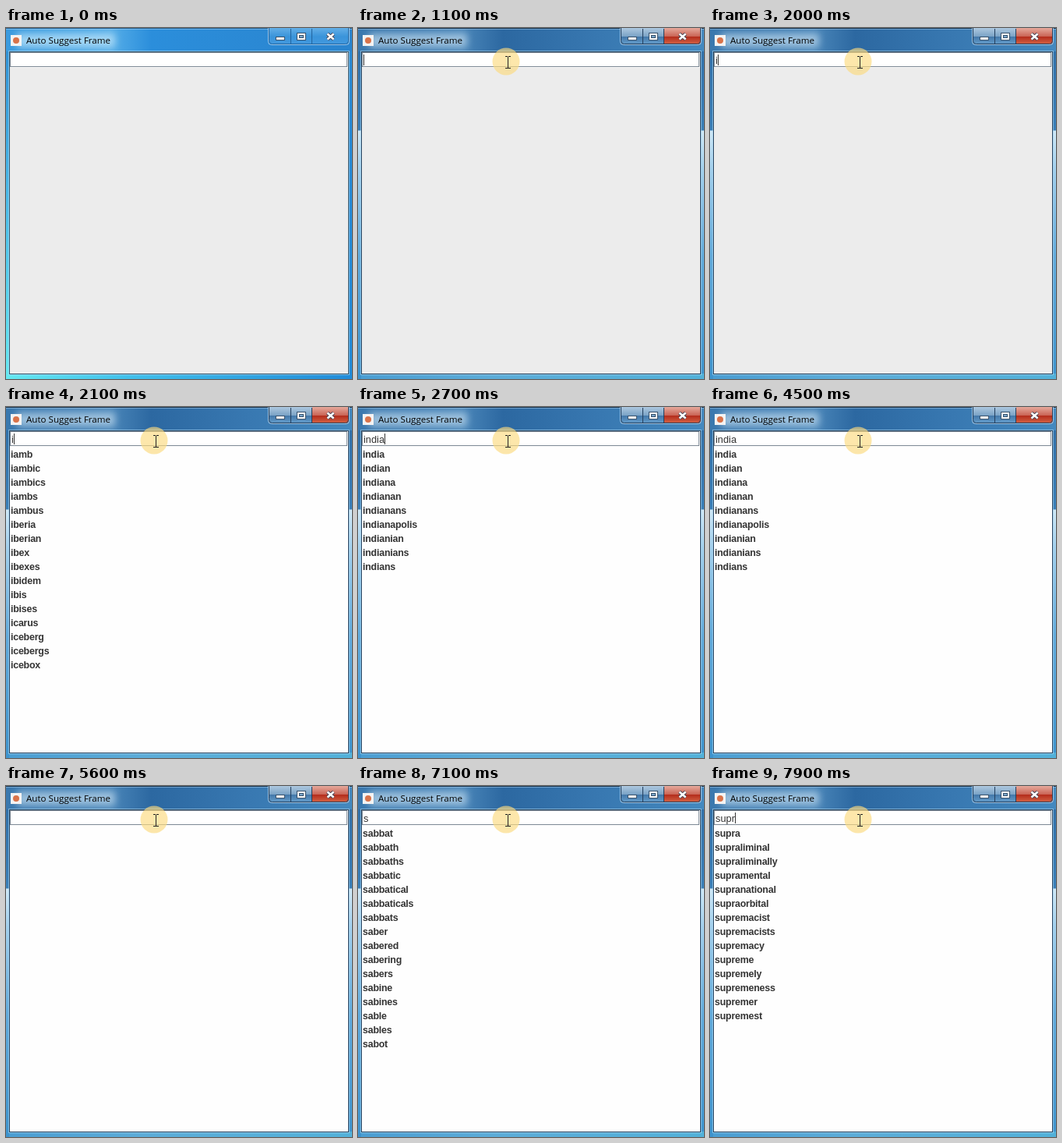
Write an HTML page with a canvas that moves like this. It is 444 px wide and 450 px high and loops after 8 s.

```html
<!DOCTYPE html>
<html lang="en">
<head>
<meta charset="utf-8">
<title>Auto Suggest Frame</title>
<style>
html, body { margin: 0; width: 100%; height: 100%; overflow: hidden; }
canvas { display: block; }
</style>
</head>
<body>
<canvas id="stage" width="444" height="450"></canvas>
<script>
const g = document.getElementById('stage').getContext('2d');
const LOOP = 8000, ACTIVATED = 1000, LIST_OPEN = 2100;

const words = {
  '': '',
  i: 'iamb iambic iambics iambs iambus iberia iberian ibex ibexes ibidem ibis ibises icarus iceberg icebergs icebox',
  in: 'inability inaccuracy inaction inactive inadequate inane inanely inanimate inapt inaudible inaugural inboard inborn inbound inbred inbuilt',
  ind: 'indebted indebtedness indecency indecent indecision indecisive indeed indefinite indelible indemnify indent indented index indexed india indian',
  indi: 'india indian indiana indianan indianans indianapolis indianian indianians indians indicate indicated indicates indication indicative indicator indict',
  india: 'india indian indiana indianan indianans indianapolis indianian indianians indians',
  s: 'sabbat sabbath sabbaths sabbatic sabbatical sabbaticals sabbats saber sabered sabering sabers sabine sabines sable sables sabot',
  su: 'suable suably suasion suasive suave suavely suaver suavest suavity subacute subaltern subarctic subatomic subclass subdue subdued',
  sup: 'super superable superably superb superbly supercargo supercool superego superegos superfine superheat superhuman superior superman supermen supernal',
  supr: 'supra supraliminal supraliminally supramental supranational supraorbital supremacist supremacists supremacy supreme supremely supremeness supremer supremest'
};

// Key presses: time and resulting field text
const keys = [
  [1000, ''], [1900, 'i'], [2200, 'in'], [2300, 'ind'], [2500, 'indi'], [2600, 'india'],
  [4700, 'indi'], [4800, 'ind'], [4900, 'in'], [5000, 'i'], [5100, ''],
  [6600, 's'], [7400, 'su'], [7600, 'sup'], [7800, 'supr']
];

const arrow = new Path2D('M0 0V16L4 12L7 18L9 17L6 11H11Z');

function fade(x0, y0, x1, y1, ...stops) {
  const f = g.createLinearGradient(x0, y0, x1, y1);
  stops.forEach(([at, color]) => f.addColorStop(at, color));
  return f;
}
function box(x, y, w, h, fill) {
  g.fillStyle = fill;
  g.fillRect(x, y, w, h);
}
function frame(x, y, w, h, color) {
  g.strokeStyle = color;
  g.lineWidth = 1;
  g.strokeRect(x + .5, y + .5, w - 1, h - 1);
}
function text(s, x, y, font, color) {
  g.font = font;
  g.fillStyle = color;
  g.fillText(s, x, y);
}

function glass(active) {
  if (active) {
    box(0, 0, 444, 450, fade(0, 0, 0, 450, [0, '#2f6da6'], [.29, '#3a7fb8'], [.294, '#cfe8f6'],
      [.4, '#a3d0ed'], [.65, '#62abdc'], [1, '#3d93cd']));
    box(0, 0, 444, 30, fade(0, 0, 444, 0, [0, '#3a78ae'], [.3, '#4a86b9'], [.42, '#2c68a1'], [.7, '#3878b1'], [1, '#4489bf']));
    box(4, 443, 440, 7, fade(0, 0, 444, 0, [0, '#4a9dd2'], [.4, '#5cacd8'], [1, '#52b1d9']));
  } else {
    box(0, 0, 444, 450, '#2a91dc');
    box(0, 0, 5, 450, fade(0, 0, 0, 450, [0, '#2c8cd4'], [.45, '#48b7e7'], [1, '#65e9f1']));
    box(439, 0, 5, 450, fade(0, 0, 0, 450, [0, '#2a89d3'], [1, '#228bd8']));
    box(0, 443, 444, 7, fade(0, 0, 444, 0, [0, '#65e9f1'], [.35, '#41c0eb'], [1, '#218bd8']));
    box(0, 0, 444, 30, fade(0, 0, 444, 0, [0, '#3a9ade'], [.3, '#56aee8'], [.42, '#2b8edb'], [1, '#2a84ce']));
  }
  // Soft glow behind the caption
  g.save();
  g.filter = 'blur(5px)';
  box(14, 7, 126, 18, active ? 'rgba(190,216,236,.72)' : 'rgba(190,228,250,.75)');
  g.restore();
  box(0, 0, 444, 1, active ? '#15334f' : '#215d8d');
  box(0, 1, 444, 1, 'rgba(190,225,250,.45)');
}

function buttons(active) {
  g.save();
  g.beginPath();
  g.roundRect(337, -5, 103, 26, 4);
  g.clip();
  box(337, 0, 56, 21, active
    ? fade(0, 1, 0, 21, [0, '#a9c5dd'], [.48, '#7ba3c6'], [.5, '#4377a8'], [1, '#649dcb'])
    : fade(0, 1, 0, 21, [0, '#60ace5'], [.5, '#3a94da'], [1, '#4299de']));
  box(393, 0, 47, 21, active
    ? fade(0, 1, 0, 21, [0, '#e3a396'], [.48, '#ca6556'], [.5, '#b32b1b'], [1, '#d46445'])
    : fade(0, 1, 0, 21, [0, '#60ace5'], [.5, '#3a94da'], [1, '#4299de']));
  const edge = active ? '#233f5d' : '#2265a0';
  box(365, 1, 1, 20, edge);
  box(392, 1, 1, 20, edge);
  g.restore();
  g.lineWidth = 1;
  g.strokeStyle = 'rgba(210,233,250,.65)';
  g.beginPath();
  g.roundRect(336.5, -5, 104, 26.5, 4);
  g.stroke();
  g.strokeStyle = edge;
  g.beginPath();
  g.roundRect(337.5, -5, 102, 25.5, 4);
  g.stroke();

  box(346, 11, 12, 5, '#39526c');
  box(347, 12, 10, 3, '#fff');
  box(373, 6, 12, 10, '#39526c');
  box(374, 7, 10, 8, '#fff');
  box(376, 9, 6, 4, '#39526c');
  box(377, 10, 4, 2, '#7ba7cc');
  for (const [color, width] of [['#4a4655', 4.4], ['#fff', 2.5]]) {
    g.strokeStyle = color;
    g.lineWidth = width;
    g.beginPath();
    g.moveTo(412.5, 7.5); g.lineTo(420.5, 14.5);
    g.moveTo(420.5, 7.5); g.lineTo(412.5, 14.5);
    g.stroke();
  }
}

function halo(x, y) {
  g.fillStyle = 'rgba(252,219,128,.66)';
  g.beginPath();
  g.arc(x, y, 17.5, 0, 7);
  g.fill();
}

function pointer(t) {
  if (t < 400) return;
  const p = Math.min(1, (t - 400) / 500), e = p * p * (3 - 2 * p);
  const x = 440 - 248 * e, y = 290 - 246 * e;
  halo(x - 2, y - 1);
  if (y < 50) {
    const cx = Math.round(x), cy = Math.round(y);
    box(cx, cy - 7, 1, 15, '#222');
    for (const end of [cy - 8, cy + 7]) {
      box(cx - 3, end, 3, 1, '#222');
      box(cx + 1, end, 3, 1, '#222');
    }
  } else {
    g.save();
    g.translate(x, y);
    g.fillStyle = '#fff';
    g.strokeStyle = '#111';
    g.lineWidth = 1;
    g.fill(arrow);
    g.stroke(arrow);
    g.restore();
  }
}

function draw(t) {
  const active = t >= ACTIVATED, open = t >= LIST_OPEN;
  glass(active);
  box(6, 9, 14, 14, '#f3f3f3');
  g.fillStyle = '#d9734a';
  g.beginPath();
  g.arc(13, 16, 4, 0, 7);
  g.fill();
  text('Auto Suggest Frame', 26, 20, '11.6px "Open Sans", "Noto Sans", sans-serif', '#000');
  buttons(active);

  frame(3, 29, 438, 416, 'rgba(175,220,245,.6)');
  frame(4, 30, 436, 414, active ? '#25425f' : '#36566c');
  box(5, 31, 434, 412, open ? '#fefefe' : '#ececec');
  box(5, 31, 433, 19, '#fff');
  frame(5, 31, 433, 19, '#7d8995');
  box(5, 50, 434, 1, open ? '#fefefe' : '#f9f9f9');

  const last = keys.filter(k => t >= k[0]).pop();
  if (last) {
    const [since, typed] = last;
    text(typed, 7, 46, '12.8px "Liberation Sans", Arial, sans-serif', '#333');
    const caret = 7 + Math.round(g.measureText(typed).width);
    if (Math.floor((t - since) / 500) % 2 === 0) box(caret, 34, 1, 14, '#333');
    if (open) {
      g.letterSpacing = '-0.2px';
      words[typed].split(' ').forEach((word, i) =>
        text(word, 6, 65 + 18 * i, 'bold 12.4px "Liberation Sans", Arial, sans-serif', '#333'));
      g.letterSpacing = '0px';
    }
  }
  pointer(t);
}

function tick() {
  draw(performance.now() % LOOP);
  requestAnimationFrame(tick);
}
tick();
</script>
</body>
</html>
```
